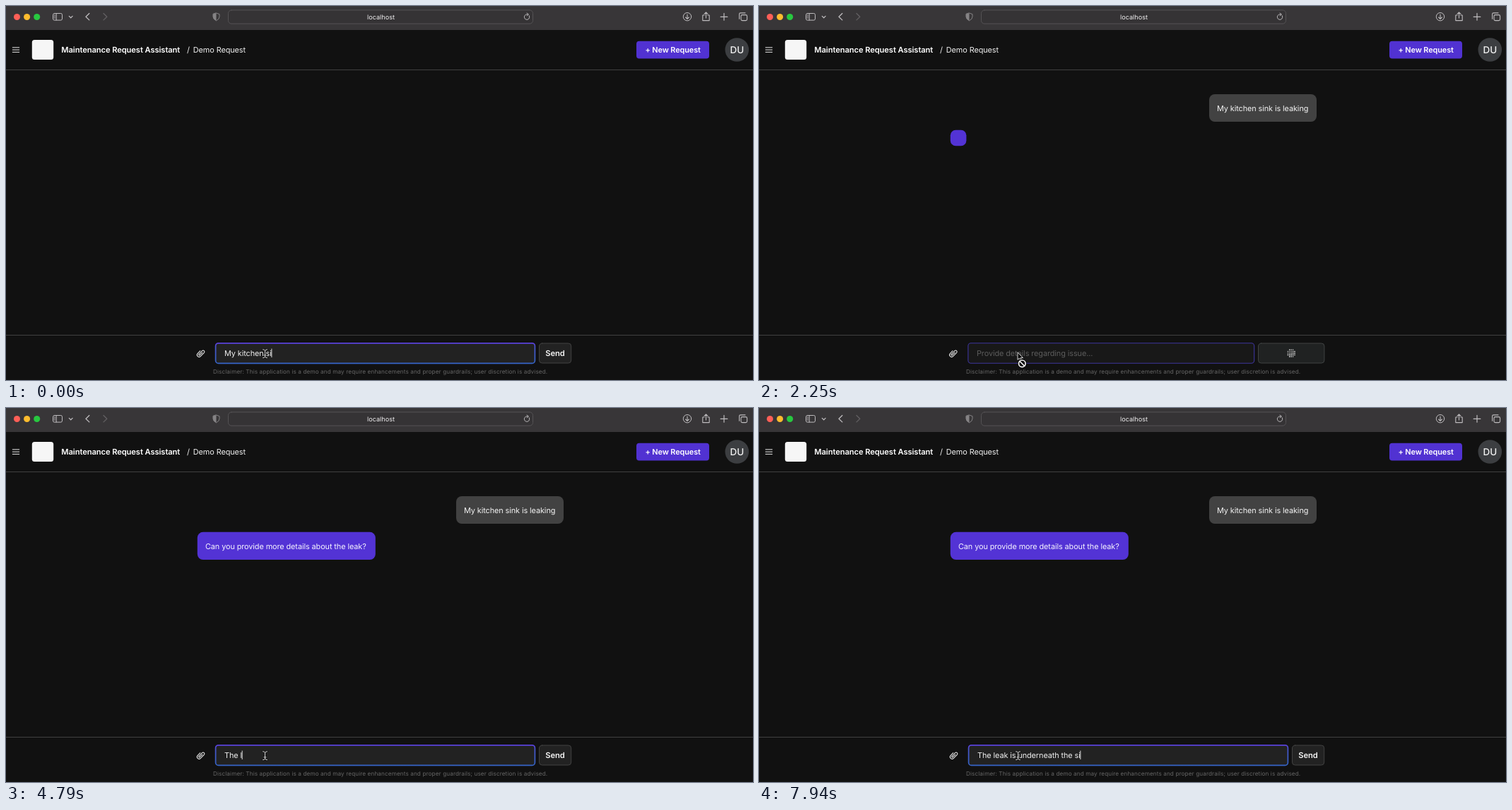
Write an HTML page with a canvas that moves like this. It is 1057x530 px and loops after 8000 ms.

```html
<!DOCTYPE html>
<html lang="en">
<head>
<meta charset="utf-8">
<title>Maintenance Request Assistant</title>
<style>
  html, body { margin: 0; width: 100%; height: 100%; overflow: hidden; background: #111; }
  canvas { display: block; width: 1057px; height: 530px; }
</style>
</head>
<body>
<canvas id="stage"></canvas>
<script>
const W = 1057, H = 530, LOOP = 8000, STEP = 150;
const canvas = document.getElementById('stage');
const dpr = window.devicePixelRatio || 1;
canvas.width = W * dpr;
canvas.height = H * dpr;
const ctx = canvas.getContext('2d');

const ISSUE = 'My kitchen sink is leaking';
const QUESTION = 'Can you provide more details about the leak?';
const ANSWER = 'The leak is underneath the si';
const HINT = 'Provide details regarding issue...';

const SENT = 1950, STREAM = 2100, PARTIAL = 2400, READY = 2540;

// Each burst: start time, then the number of typed characters per step.
const ISSUE_BURSTS = [[0, 13, 14, 15, 17, 18, 20, 22, 23, 25, 26]];
const ANSWER_BURSTS = [
  [4040, 1, 3, 4],
  [4790, 5, 6, 8, 9, 10, 12, 13],
  [5840, 14, 15, 17],
  [6590, 18, 19, 20, 22, 23, 25, 26],
  [7640, 27, 28, 29]
];

function typed(text, bursts, t) {
  let count = 0;
  for (const [start, ...counts] of bursts) {
    if (t >= start) {
      count = counts[Math.min(counts.length - 1, Math.floor((t - start) / STEP))];
    }
  }
  return text.slice(0, count);
}

function label(text, x, y, color, { size = 10.9, weight = 400, track = -0.1, align = 'left' } = {}) {
  ctx.font = `${weight} ${size}px Inter, "Open Sans", sans-serif`;
  ctx.letterSpacing = track + 'px';
  ctx.textAlign = align;
  ctx.fillStyle = color;
  ctx.fillText(text, x, y);
  return ctx.measureText(text).width;
}

function box(x, y, w, h, r, fill, stroke, line = 1) {
  ctx.beginPath();
  ctx.roundRect(x, y, w, h, r);
  paint(fill, stroke, line);
}

function disc(x, y, r, fill, stroke, line = 1) {
  ctx.beginPath();
  ctx.arc(x, y, r, 0, Math.PI * 2);
  paint(fill, stroke, line);
}

function paint(fill, stroke, line) {
  if (fill) { ctx.fillStyle = fill; ctx.fill(); }
  if (stroke) { ctx.strokeStyle = stroke; ctx.lineWidth = line; ctx.stroke(); }
}

function stroke(path, color, line = 1.1) {
  ctx.strokeStyle = color;
  ctx.lineWidth = line;
  ctx.stroke(new Path2D(path));
}

function browserBar() {
  const icon = '#bebcbe', dim = '#626062';
  ctx.fillStyle = '#383638';
  ctx.fillRect(0, 0, W, 34);
  disc(15.5, 15.5, 4.5, '#ff5f57');
  disc(29.6, 15.5, 4.5, '#febc2e');
  disc(43.7, 15.5, 4.5, '#28c840');

  box(66.5, 10.5, 13, 9.6, 2, null, icon);
  stroke('M71.2 10.5V20', icon, 1);
  stroke('M68 13H69.7M68 15H69.7M68 17H69.7', icon, 0.8);
  stroke('M89.3 14.4L91.7 16.7L94.1 14.4', icon, 1.3);
  stroke('M117.8 10.5L113 15.2L117.8 19.9', icon, 1.3);
  stroke('M138 10.5L142.8 15.2L138 19.9', dim, 1.3);

  const shield = 'M297.5 10L302 11.6V15.2Q302 18.6 297.5 20.8Q293 18.6 293 15.2V11.6Z';
  stroke(shield, '#858385', 1);
  ctx.fillStyle = '#858385';
  ctx.fill(new Path2D('M297.5 10V20.8Q293 18.6 293 15.2V11.6Z'));

  box(314.5, 5.9, 431, 19.2, 4.5, '#353335', '#555355');
  label('localhost', 530.5, 18.9, '#f0eff0', { size: 9.1, track: 0, align: 'center' });
  stroke('M740.2 13.6A3.7 3.7 0 1 1 737 11.9L739 11.9', icon, 1);
  stroke('M737.2 9.9L739.2 11.9L737.2 13.9', icon, 1);

  disc(964, 15.2, 5.7, null, icon);
  stroke('M964 12V18.2M961.6 16L964 18.4L966.4 16', icon);
  stroke('M988.2 13H985.8V20.6H995.2V13H992.8M990.5 17V9M988 11.3L990.5 8.9L993 11.3', icon);
  stroke('M1016 10.4V20.2M1011.1 15.3H1020.9', icon, 1.2);
  box(1040, 12.6, 8.6, 8, 1.8, null, icon, 1.1);
  stroke('M1037.6 18.2V11.6Q1037.6 9.9 1039.3 9.9H1046', icon);
}

function pageHeader() {
  stroke('M9.3 58.8H18.7M9.3 62.1H18.7M9.3 65.4H18.7', '#e6e6e6', 1);
  box(36.8, 48, 30.4, 28, 3.5, '#f6f6f6');
  label('Maintenance Request Assistant', 78.3, 66, '#fff', { size: 11.2, weight: 600 });
  label('/', 256, 66, '#eee', { size: 11.2 });
  label('Demo Request', 264.8, 66.1, '#f0f0f0');
  box(892, 49.8, 103, 24.8, 4, '#5132d2');
  label('+ New Request', 943.6, 66, '#fff', { weight: 600, align: 'center' });
  disc(1034.3, 62, 16.8, '#3c3e41');
  label('DU', 1034.3, 67, '#f2f2f2', { size: 13.5, weight: 500, track: 0, align: 'center' });
  ctx.fillStyle = '#404040';
  ctx.fillRect(0, 90, W, 1);
}

function messages(t) {
  if (t < SENT) return;
  box(637, 125, 152, 39, 8, '#424242');
  label(ISSUE, 648, 148.8, '#f4f4f4');
  if (t < STREAM) return;
  if (t < PARTIAL) {
    box(270.8, 175.8, 22.6, 22.4, 7.5, '#5333d5');
    return;
  }
  const reply = t < READY ? QUESTION.slice(0, 20) : QUESTION;
  ctx.font = '400 10.9px Inter, "Open Sans", sans-serif';
  ctx.letterSpacing = '-0.1px';
  const width = t < READY ? ctx.measureText(reply).width + 22.6 : 252;
  box(270.8, 175.8, width, 39.2, 8, '#5333d5');
  label(reply, 282, 199.6, '#f6f4ff');
}

function paperclip(x, y) {
  ctx.save();
  ctx.translate(x, y);
  ctx.rotate(Math.PI / 4);
  stroke('M-2.9 -2V3a2.9 2.9 0 0 0 5.8 0V-4a1.9 1.9 0 0 0 -3.8 0V2.6a.95 .95 0 0 0 1.9 0V-2.5', '#e8e8e8', 1.05);
  ctx.restore();
}

function spinner(x, y, t) {
  const phase = Math.floor(t / STEP);
  for (let row = -2; row <= 2; row++) {
    for (let col = -2; col <= 2; col++) {
      if (Math.abs(row) + Math.abs(col) === 4) continue;
      const wave = Math.sin(phase * 1.7 + row * 1.3 + col * 0.8);
      disc(x + col * 2.4, y + row * 2.4, 0.85, `rgba(255,255,255,${0.78 + 0.2 * wave})`);
    }
  }
}

function ibeam(x, y) {
  const shape = `M${x - 3} ${y - 6}Q${x} ${y - 6} ${x} ${y - 4}V${y + 4}Q${x} ${y + 6} ${x - 3} ${y + 6}`
    + `M${x + 3} ${y - 6}Q${x} ${y - 6} ${x} ${y - 4}M${x} ${y + 4}Q${x} ${y + 6} ${x + 3} ${y + 6}`
    + `M${x - 1.6} ${y + 2.2}H${x + 1.6}`;
  stroke(shape, '#0c0c0c', 2.2);
  stroke(shape, '#d8d8d8', 1);
}

function blockedPointer() {
  const arrow = new Path2D('M366 491.2V501.3L368.4 499.1L370 502.6L371.6 501.9L370.1 498.6H373.2Z');
  ctx.fillStyle = '#050505';
  ctx.fill(arrow);
  ctx.strokeStyle = '#eee';
  ctx.lineWidth = 0.9;
  ctx.stroke(arrow);
  disc(372.3, 506.8, 6.4, '#0a0a0a');
  disc(372.3, 506.8, 4.8, null, '#f2f2f2', 1.7);
  stroke('M369 503.5L375.6 510.1', '#f2f2f2', 1.7);
}

function activeInput(t) {
  const edge = ctx.createLinearGradient(0, 477, 0, 507);
  edge.addColorStop(0, '#5b3edb');
  edge.addColorStop(0.25, '#4757cf');
  edge.addColorStop(1, '#3564c6');
  box(296.6, 477.8, 451.8, 28.6, 4, '#222', edge, 1.7);
  box(754.5, 478, 45.2, 28, 4, '#222', '#424242');
  label('Send', 777, 495.9, '#f4f4f4', { size: 11.2, weight: 600, align: 'center' });
  paperclip(275.4, 492.2);

  const text = t < SENT ? typed(ISSUE, ISSUE_BURSTS, t) : typed(ANSWER, ANSWER_BURSTS, t);
  const width = text ? label(text, 309, 496, '#f0f0f0') : 0;
  if (!text) label(HINT, 309, 496, '#929292');
  const hidden = (t >= 1800 && t < SENT) || (t >= 2990 && t < 3440);
  if (!hidden) {
    ctx.fillStyle = '#eee';
    ctx.fillRect(308.7 + width, 485.6, 0.9, 12.4);
  }
  ibeam(366.5, 492.7);
}

function disabledInput(t) {
  box(295.9, 477.8, 404.8, 28.4, 4, '#181818', '#3c349c', 1.1);
  box(706.5, 478, 93.4, 28, 4, '#202222', '#404343');
  spinner(753.2, 492, t);
  paperclip(274.7, 492.2);
  label(HINT, 308, 496, '#5c5c5c');
}

function pageFooter(t) {
  const busy = t >= SENT && t < READY;
  ctx.fillStyle = '#404040';
  ctx.fillRect(0, 466, W, 1);
  (busy ? disabledInput : activeInput)(t);
  label('Disclaimer: This application is a demo and may require enhancements and proper guardrails; user discretion is advised.',
    293, 521, '#656565', { size: 8.2, track: 0.1 });
  if (busy) blockedPointer();
}

function draw(t) {
  ctx.setTransform(dpr, 0, 0, dpr, 0, 0);
  ctx.textRendering = 'geometricPrecision';
  ctx.lineCap = ctx.lineJoin = 'round';
  ctx.fillStyle = '#111';
  ctx.fillRect(0, 0, W, H);
  browserBar();
  pageHeader();
  messages(t);
  pageFooter(t);
}

const origin = performance.now();
function tick() {
  draw((performance.now() - origin) % LOOP);
  requestAnimationFrame(tick);
}
tick();
</script>
</body>
</html>
```
